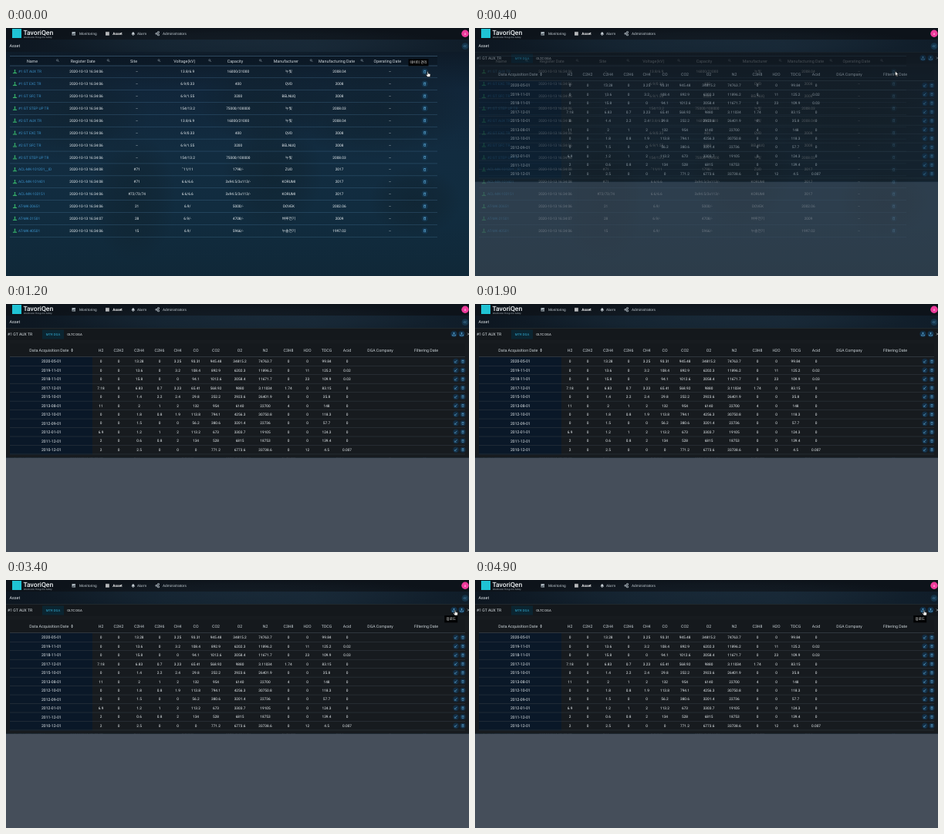
Recreate the animation shown at these times as an HTML page with a canvas. Size 600 by 322 pixels, loop 5000 ms.

```html
<!DOCTYPE html>
<html lang="en">
<head>
<meta charset="utf-8">
<title>Asset</title>
<style>
html, body { margin: 0; width: 100%; height: 100%; overflow: hidden; background: #0c1a26; }
canvas { display: block; width: 600px; height: 322px; }
</style>
</head>
<body>
<canvas id="stage"></canvas>
<script>
const W = 600, H = 322, LOOP = 5000;
const FONT = 'Roboto, "Noto Sans CJK KR", "Noto Sans CJK", sans-serif';
const dpr = window.devicePixelRatio || 1;

function layer(canvas) {
  canvas.width = W * dpr;
  canvas.height = H * dpr;
  const c = canvas.getContext('2d');
  c.scale(dpr, dpr);
  c.textBaseline = 'middle';
  c.textRendering = 'geometricPrecision';
  return c;
}

function text(c, s, x, y, size, color = '#e8eef1', align = 'center', weight = 400) {
  c.font = `${weight} ${size}px ${FONT}`;
  c.textAlign = align;
  c.fillStyle = color;
  c.fillText(s, x, y + 0.3);
}

function rect(c, x, y, w, h, color) {
  c.fillStyle = color;
  c.fillRect(x, y, w, h);
}

function disc(c, x, y, r, color) {
  c.fillStyle = color;
  c.beginPath();
  c.arc(x, y, r, 0, Math.PI * 2);
  c.fill();
}

function stroke(c, pts, color, width = 0.6) {
  c.strokeStyle = color;
  c.lineWidth = width;
  c.beginPath();
  pts.forEach(([x, y], i) => i ? c.lineTo(x, y) : c.moveTo(x, y));
  c.stroke();
}

function shape(c, x, y, pts) {
  c.beginPath();
  pts.forEach(([px, py], i) => i ? c.lineTo(x + px, y + py) : c.moveTo(x + px, y + py));
  c.closePath();
  c.fillStyle = '#fff';
  c.strokeStyle = '#111';
  c.lineWidth = 0.6;
  c.fill();
  c.stroke();
}

function gradient(c, x0, y0, x1, y1, colors) {
  const g = c.createLinearGradient(x0, y0, x1, y1);
  colors.forEach((col, i) => g.addColorStop(i / (colors.length - 1), col));
  return g;
}

function glow(c, x, y, rx, ry, rgb, a) {
  c.save();
  c.translate(x, y);
  c.scale(rx, ry);
  const g = c.createRadialGradient(0, 0, 0, 0, 0, 1);
  g.addColorStop(0, `rgba(${rgb},${a})`);
  g.addColorStop(0.6, `rgba(${rgb},${a * 0.6})`);
  g.addColorStop(1, `rgba(${rgb},0)`);
  c.fillStyle = g;
  c.fillRect(-1, -1, 2, 2);
  c.restore();
}

function trash(c, x, y, color) {
  rect(c, x - 1.5, y - 1.7, 3, 0.5, color);
  c.strokeStyle = color;
  c.lineWidth = 0.6;
  c.strokeRect(x - 1, y - 0.9, 2, 2.5);
}

function pencil(c, x, y, color) {
  stroke(c, [[x - 1.3, y + 1.4], [x + 1.4, y - 1.4]], color, 0.8);
  stroke(c, [[x - 1.6, y - 0.4], [x - 1.6, y + 1.7], [x + 1, y + 1.7]], color, 0.4);
}

function tray(c, x, y, color) {
  stroke(c, [[x, y + 0.8], [x, y - 2]], color, 0.8);
  stroke(c, [[x - 1.2, y - 0.7], [x, y - 2], [x + 1.2, y - 0.7]], color);
  stroke(c, [[x - 2, y + 0.6], [x - 2, y + 2], [x + 2, y + 2], [x + 2, y + 0.6]], color, 0.7);
}

function gear(c, x, y) {
  disc(c, x, y, 1.4, '#b7c1c8');
  disc(c, x, y, 0.6, '#111a23');
}

function backdrop(c) {
  rect(c, 0, 0, W, H, gradient(c, 0, 0, 0, H, ['#0c141d', '#11263a', '#122c40', '#112c3f', '#102838']));
  [[90, 110, 95, 65], [165, 220, 55, 85], [335, 95, 85, 55], [345, 190, 65, 75], [480, 105, 120, 65], [530, 225, 60, 45]]
    .forEach(([x, y, rx, ry]) => glow(c, x, y, rx, ry, '16,32,42', 0.5));
}

function topBar(c) {
  rect(c, 0, 0, W, 15, '#0d131a');
  rect(c, 0, 15, W, 16, gradient(c, 0, 0, W, 0, ['#0d1620', '#12212e', '#152533', '#101d29']));
  glow(c, 310, 18, 260, 20, '42,62,78', 0.2);
  rect(c, 8, 1, 12, 12, '#1fc3d4');
  text(c, 'TavoriQen', 22.5, 5.8, 8.6, '#f1f5f7', 'left', 500);
  text(c, 'We Monitor Things For Safety', 23, 12, 2.8, '#aeb9c0', 'left');

  rect(c, 85.5, 5, 4.5, 4.5, '#aeb9c0');
  [0, 1, 2].forEach(i => rect(c, 86.3 + i * 1.2, 7.8 - i * 0.8, 0.6, 1.2 + i * 0.8, '#111a23'));
  [0, 1, 2].forEach(i => rect(c, 129, 5.2 + i * 1.6, 4.8, 1.1, '#fff'));
  disc(c, 164.8, 6.7, 1.5, '#c3ccd2');
  rect(c, 162.8, 7.4, 4, 1.2, '#c3ccd2');
  disc(c, 164.8, 9.3, 0.6, '#c3ccd2');
  gear(c, 195, 7.3);
  gear(c, 197.5, 5.6);
  gear(c, 197.5, 8.9);
  text(c, 'Monitoring', 95, 7.4, 4.7, '#c3ccd2', 'left');
  text(c, 'Asset', 138.3, 7.4, 4.8, '#fff', 'left', 700);
  text(c, 'Alarm', 170, 7.4, 4.6, '#c3ccd2', 'left');
  text(c, 'Administrators', 203, 7.4, 4.7, '#c3ccd2', 'left');
  text(c, 'Asset', 4.5, 23.3, 5.4, '#e2e8ec', 'left');

  disc(c, 595, 7.3, 4.7, '#ee3a9b');
  text(c, 'A', 595, 7.3, 4, '#fff');
  disc(c, 595, 23.6, 4.4, '#15344a');
  [593.6, 595.6].forEach(x =>
    stroke(c, [[x + 1, 22.1], [x - 0.4, 23.6], [x + 1, 25.1]], '#5f9fc8', 0.6));
}

const units = ['AUX', 'EXC', 'SFC', 'STEP UP'];
const unitSpecs = [
  '–|13.8/6.9|16000/21000|누빛|2008.04',
  '–|6.9/0.33|400|QVD|2008',
  '–|6.9/1.55|3200|BELNUQ|2008',
  '–|154/13.2|75000/100000|누빛|2008.03'
];
const assets = [];
[1, 2].forEach(n => units.forEach((u, i) =>
  assets.push(`#${n} GT ${u} TR|06|${unitSpecs[i]}`)));
assets.push(
  'ACL-MK-101201__ID|08|#71|˜11/11|1798/-|ZUO|2017',
  'ACL-MK-101401|08|#71|6.6/6.6|3x94.5/3x113/-|KORUMI|2017',
  'ACL-MK-102151|06|#72/73/74|6.6/6.6|3x94.5/3x113/-|KORUMI|2017',
  'AT-MK-20651|06|21|6.9/|5000/-|DOVEK|2002.06',
  'AT-MK-21501|07|28|6.9/-|4708/-|벼루전기|2009',
  'AT-MK-40501|06|15|6.9/|5966/-|누솔전기|1997.02'
);

function unitIcon(c, x, y, color) {
  disc(c, x, y - 1.7, 0.9, color);
  stroke(c, [[x, y - 1.5], [x, y + 1]], color, 0.8);
  stroke(c, [[x - 1.6, y + 0.9], [x + 1.6, y + 0.9]], color, 0.7);
  stroke(c, [[x - 2.6, y + 2.1], [x + 2.6, y + 2.1]], color, 1);
}

function assetList(c) {
  const heads = ['Name', 'Register Date', 'Site', 'Voltage(kV)', 'Capacity',
    'Manufacturer', 'Manufacturing Date', 'Operating Date'];
  const step = 65.75, left = 5, width = 554;
  rect(c, left, 36, width, 0.8, 'rgba(100,150,185,.5)');
  rect(c, left, 36.8, width, 12, 'rgba(6,14,22,.25)');
  rect(c, left, 48.6, width, 0.8, 'rgba(100,150,185,.45)');
  heads.forEach((h, i) => {
    const x = 34 + i * step;
    text(c, h, x, 42.8, 5.35, '#d3dbe0');
    c.strokeStyle = '#9aa9b3';
    c.lineWidth = 0.5;
    c.beginPath();
    c.arc(x + 32.5, 41.8, 1.1, 0, Math.PI * 2);
    c.stroke();
    stroke(c, [[x + 33.3, 42.6], [x + 34.6, 43.9]], '#9aa9b3', 0.6);
  });
  assets.forEach((row, r) => {
    const y = 56.6 + r * 15.89;
    const [name, sec, ...rest] = row.split('|');
    unitIcon(c, 11.5, y, '#38b56b');
    text(c, name, 16, y, 4.75, '#3a8fc6', 'left');
    [`2020-10-13 16:34:${sec}`, ...rest, '–'].forEach((v, i) =>
      text(c, v, 104 + i * 65.6, y, 4.75));
    disc(c, 542.7, y, 3.9, '#14364f');
    trash(c, 542.7, y, '#5aa9d8');
    rect(c, left, y + 7.8, width, 0.6, 'rgba(90,145,185,.4)');
  });
}

// Dots stand for zero readings.
const readings = [
  '2020-05-01 . 13.28 . 3.25 93.31 945.48 34815.2 74763.7 . . 99.84 .',
  '2019-11-01 . 13.6 . 3.2 108.4 892.9 6202.3 11896.2 . 11 125.2 0.02',
  '2018-11-01 . 15.8 . . 94.1 1012.6 2058.4 11671.7 . 23 109.9 0.03',
  '2017-12-01 7.18 6.83 0.7 3.23 65.41 568.92 9880 3.11034 1.74 . 83.15 .',
  '2015-10-01 . 1.4 2.2 2.4 29.8 252.2 2923.6 26401.9 . . 35.8 .',
  '2013-08-01 11 2 1 2 132 954 6140 22700 4 . 148 .',
  '2012-10-01 . 1.8 0.8 1.9 113.8 794.1 4256.3 30750.8 . . 118.3 .',
  '2012-09-01 . 1.5 . . 56.2 380.6 3201.4 22736 . . 57.7 .',
  '2012-01-01 6.9 1.2 1 2 113.2 673 3303.7 19105 . . 124.3 .',
  '2011-12-01 2 0.6 0.8 2 134 528 6815 18753 . . 139.4 .',
  '2010-12-01 2 2.5 . . . 771.2 6773.6 33738.6 . 12 4.5 0.007'
];
const gases = ['H2', 'C2H2', 'C2H4', 'C2H6', 'CH4', 'CO', 'CO2', 'O2', 'N2', 'C3H8', 'H2O', 'TDCG', 'Acid'];
const gasX = [123, 146, 172.5, 199, 222.5, 246, 272, 303, 336, 366, 390.5, 415.5, 442];

function panel(c) {
  rect(c, 0, 199.5, W, H - 199.5, '#454e5a');
  rect(c, 0, 31, W, 168.5, '#171b1f');
  rect(c, 0, 31, W, 15.5, '#14181c');
  rect(c, 0, 31, W, 0.6, '#29323a');
  text(c, '#1 GT AUX TR', 2, 39, 5.1, '#dfe6ea', 'left');
  rect(c, 47, 33.5, 28, 12, '#0b2531');
  text(c, 'MTR DGA', 61, 39.2, 4.25, '#32a8cf');
  text(c, 'OLTC DGA', 89, 39.2, 4.25);
  [580.5, 590.5].forEach(x => {
    disc(c, x, 39, 4.1, '#12314a');
    tray(c, x, 39, '#62b4e4');
  });
  stroke(c, [[597.8, 37.5], [600.8, 40.5]], '#c3ccd2');
  stroke(c, [[597.8, 40.5], [600.8, 37.5]], '#c3ccd2');

  rect(c, 5, 51, 590, 17.5, '#15191d');
  rect(c, 5, 68.5, 107, 127, '#0a1828');
  rect(c, 5, 68.3, 590, 0.7, '#3b444b');
  text(c, 'Data Acquisition Date', 55.8, 59.8, 5.3, '#ccd4d9');
  c.fillStyle = '#dfe6ea';
  [-1, 1].forEach(d => {
    c.beginPath();
    c.moveTo(84.4, 60 + d * 0.6);
    c.lineTo(86.8, 60 + d * 0.6);
    c.lineTo(85.6, 60 + d * 2.2);
    c.fill();
  });
  gases.forEach((g, i) => text(c, g, gasX[i], 59.8, 5.2, '#ccd4d9'));
  text(c, 'DGA Company', 485, 59.8, 5.2, '#ccd4d9');
  text(c, 'Filtering Date', 544.5, 59.8, 5.3, '#ccd4d9');

  readings.forEach((row, r) => {
    const y = 74.5 + r * 11.47;
    const [date, h2, ...rest] = row.split(' ');
    text(c, date, 58.8, y, 5.1);
    [h2, '.', ...rest].forEach((v, i) =>
      text(c, v === '.' ? '0' : v, gasX[i], y, 4.75));
    [583, 592].forEach(x => disc(c, x, y, 3.7, '#132d43'));
    pencil(c, 583, y, '#5aa5d2');
    trash(c, 592, y, '#5aa5d2');
    rect(c, 5, y + 5.5, 590, 0.5, '#343d44');
  });
}

function tooltip(c, s, x, y, w, size) {
  rect(c, x - w / 2, y - 4.6, w, 9.2, '#020304');
  text(c, s, x, y, size, '#fff', 'center', 500);
}

function arrow(c, x, y) {
  shape(c, x, y, [[0, 0], [0, 6], [1.4, 4.8], [2.4, 7], [3.4, 6.5], [2.4, 4.4], [4.2, 4.3]]);
}

function hand(c, x, y) {
  shape(c, x, y, [[-0.6, 0], [0.5, 0], [0.7, 2.6], [3, 3], [3.5, 4], [3.1, 7], [-0.4, 7], [-2.3, 4.2], [-1.6, 3.6], [-0.6, 4.6]]);
}

function track(keys, t) {
  if (t <= keys[0][0]) return keys[0][1];
  for (let i = 1; i < keys.length; i++) {
    const [t0, v0] = keys[i - 1], [t1, v1] = keys[i];
    if (t <= t1) return v0 + (v1 - v0) * (t - t0) / (t1 - t0);
  }
  return keys[keys.length - 1][1];
}

const panelFade = [[100, 0], [300, 0.3], [400, 0.54], [500, 0.84], [600, 0.94], [800, 1]];
const listFade = [[100, 1], [400, 0.6], [800, 0.4]];
const pathX = [[2400, 546], [2600, 567], [2900, 580.5], [3000, 582]];
const pathY = [[2400, 55], [2600, 43], [2900, 39.5], [3000, 39]];

const ctx = layer(document.getElementById('stage'));
const base = layer(document.createElement('canvas'));
const list = layer(document.createElement('canvas'));
const over = layer(document.createElement('canvas'));
backdrop(base);
topBar(base);
assetList(list);
panel(over);

function blend(src, alpha) {
  ctx.globalAlpha = alpha;
  ctx.drawImage(src.canvas, 0, 0, W, H);
  ctx.globalAlpha = 1;
}

function draw(t) {
  blend(base, 1);
  blend(list, track(listFade, t));
  blend(over, track(panelFade, t));

  if (t < 200) {
    tooltip(ctx, '데이터 관리', 534.5, 44.8, 26, 4.5);
    hand(ctx, 546.5, 56.5);
  } else if (t < 800) {
    arrow(ctx, 544.5, 56);
  } else if (t >= 2400) {
    const x = track(pathX, t), y = track(pathY, t);
    if (t < 3000) {
      arrow(ctx, x, y);
    } else {
      ctx.globalAlpha = track([[3000, 0.2], [3300, 1]], t);
      tooltip(ctx, '업로드', 576.7, 50.7, 17, 4.5);
      ctx.globalAlpha = 1;
      hand(ctx, x, y);
    }
  }
}

const start = performance.now();
function tick() {
  const t = (performance.now() - start) % LOOP;
  draw(Math.floor(t / 100) * 100);
  requestAnimationFrame(tick);
}
tick();
</script>
</body>
</html>
```
